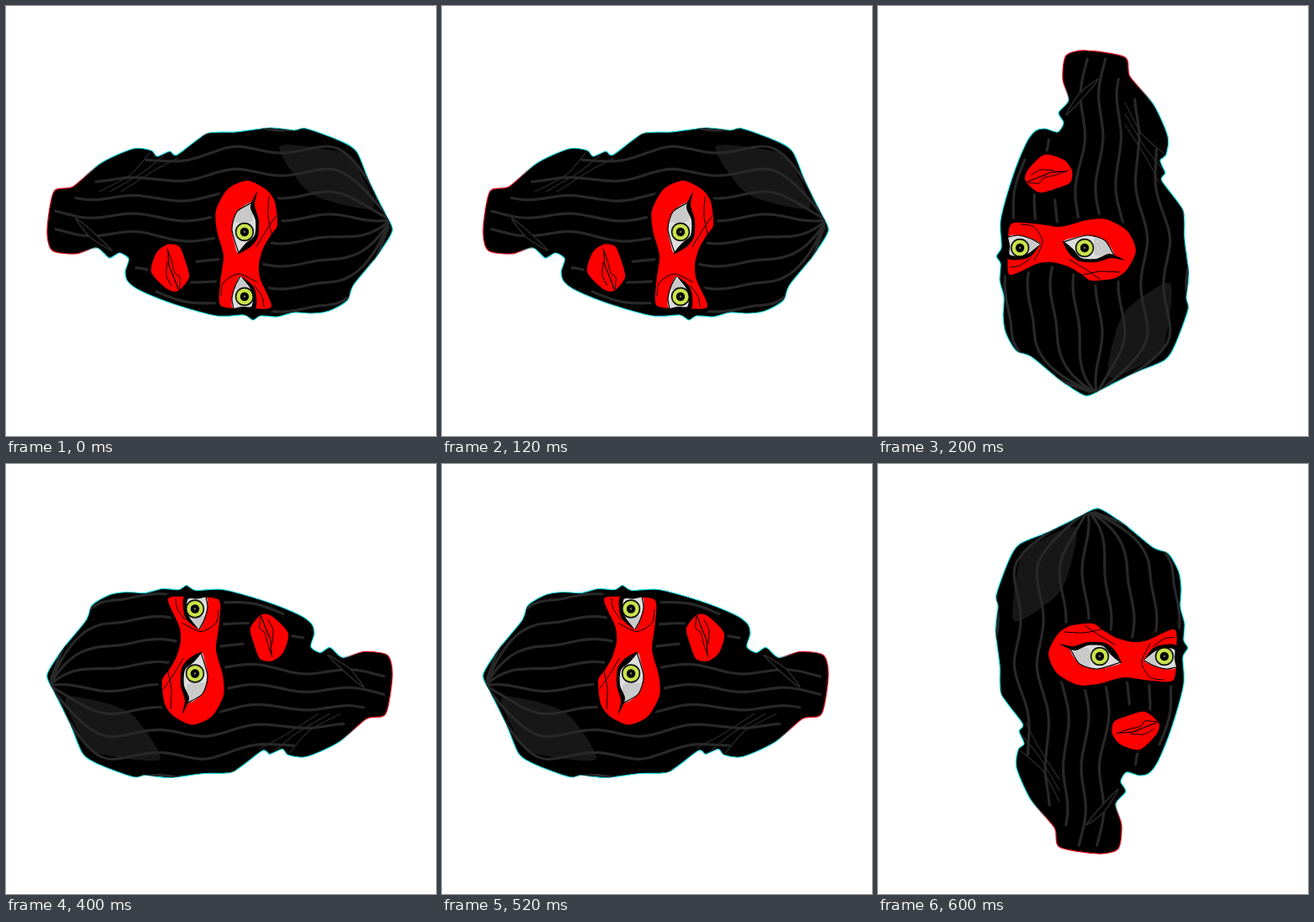
Recreate the animation shown at these times as an HTML page. Size 512 px wide and 512 px high, loop 800 ms.

```html
<!DOCTYPE html>
<html lang="en">
<head>
<meta charset="utf-8">
<title>Turning mask</title>
<style>
html, body { margin: 0; width: 100%; height: 100%; overflow: hidden; background: #fff; }
svg { display: block; width: 100vw; height: 100vh; }
path { fill: none; stroke-linecap: round; stroke-linejoin: round; }
</style>
</head>
<body>
<svg viewBox="0 0 512 512">
  <defs>
    <linearGradient id="fringe" gradientUnits="userSpaceOnUse" x1="0" y1="400" x2="0" y2="425">
      <stop stop-color="#19dfe3"/>
      <stop offset="1" stop-color="#e01020"/>
    </linearGradient>
    <clipPath id="inside"><path id="hood"/></clipPath>
  </defs>
  <g id="head"></g>
</svg>
<script>
const head = document.getElementById('head');

function add(tag, attrs, parent = head) {
  const el = document.createElementNS('http://www.w3.org/2000/svg', tag);
  for (const key in attrs) el.setAttribute(key, attrs[key]);
  return parent.appendChild(el);
}

// Catmull-Rom curve through key points; tension 0 gives straight edges.
function curve(text, closed, tension = 0.13) {
  const p = text.split(' ').map(s => s.split(',').map(Number));
  const n = p.length;
  const at = i => closed ? p[(i + n) % n] : p[Math.max(0, Math.min(n - 1, i))];
  const handle = (i, dir) => at(i).map((v, a) => v + dir * tension * (at(i + 1)[a] - at(i - 1)[a]));
  let d = `M${p[0]}`;
  for (let i = 0; i < (closed ? n : n - 1); i++) d += `C${handle(i, 1)} ${handle(i + 1, -1)} ${at(i + 1)}`;
  return d;
}
const shape = (text, fill, stroke = 'none', width = 0) =>
  add('path', { d: curve(text, true), style: `fill:${fill}`, stroke, 'stroke-width': width });
const line = (text, stroke = '#000', width = 1, parent = head) =>
  add('path', { d: curve(text, false), stroke, 'stroke-width': width }, parent);

function iris(cx, cy) {
  add('circle', { cx, cy, r: 10.4, fill: '#c9e24b', stroke: '#111', 'stroke-width': 1.6 });
  add('circle', { cx, cy, r: 5.2, fill: '#000' });
  add('circle', { cx, cy, r: 1.4, fill: '#666' });
}

// Hood
const hood = '263,53 295,73 327,99 346,107 358,128 361,148 360,170 365,190 364,210 369,219 363,230 364,262 350,313 334,353 323,368 311,371 296,367 289,378 295,390 283,405 290,430 286,458 262,464 216,456 210,433 182,400 165,362 167,340 174,333 168,318 172,309 147,274 145,240 140,198 143,170 141,155 156,114 169,95 205,80 243,61';
document.getElementById('hood').setAttribute('d', curve(hood, true));
shape(hood, '#000', 'url(#fringe)', 1.2);
shape('235,75 226,132 209,160 162,187 167,122 180,99', '#171717');

// Knitted stripes fan out from the crown, then sway together down to the neck.
const knit = add('g', { 'clip-path': 'url(#inside)' });
const ends = [287, 352, 407, 432, 457, 457, 292, 362, 345];
function stripeX(k, y) {
  const fan = Math.max(0, 130 - y) / 75;
  const taper = Math.max(0, Math.min(1, (y - 240) / 110));
  const gap = 27 * (1 - fan * fan) - 5.5 * taper;
  const sway = 4 * Math.cos((y - 185) * 2 * Math.PI / 115);
  return 247 + sway - Math.max(0, y - 340) * 0.05 + k * gap;
}
ends.forEach((end, i) => {
  const pts = [];
  for (let y = 58; y <= end; y += 12) pts.push(`${stripeX(i - 4, y).toFixed(1)},${y}`);
  line(pts.join(' '), '#282828', 3.2, knit);
});

// Folds at the neck
const fold = '#292929';
for (let i = 0; i < 3; i++) line(`${176 - i * 3},${308 + i * 17} ${190 + i * 3},${335 + i * 15} 216,${376 + i * 13}`, fold, 1.3, knit);
shape('248,430 261,413 286,387 270,413', '#000', fold, 1.6);

// Eye opening; the black rim keeps the stripes away from it
const opening = '228,193 256,190 268,198 284,207 303,212 321,210 353,197 355,224 352,257 326,258 296,254 283,256 262,262 238,263 213,249 203,226 213,204';
shape(opening, '#f00', '#000', 9);
shape(opening, '#f00');
line('222,200 245,201 266,197');
line('246,192 262,203 282,215');
line('324,214 314,236 324,254 340,257');
line('328,217 341,208 353,206');

// Eyes: white, shade, iris, heavy upper lid
shape('229,220 250,215 272,217 289,236 277,241 261,244 240,238', '#dedede');
shape('232,222 251,220 252,242 240,237', '#c9c9c9');
line('229,220 240,238 261,244 289,236', '#000', 1.2);
iris(264, 229);
shape('216,214 232,217 250,212 270,213 282,222 290,237 278,228 268,217 250,216 234,222', '#000');

shape('317,234 328,223 341,217 355,219 355,242 343,244 328,240', '#dedede');
shape('319,234 331,225 332,241', '#c9c9c9');
line('317,234 328,240 343,244 355,242', '#000', 1.2);
iris(341, 229);
shape('317,233 328,219 341,215 356,217 356,243 353,232 353,221 341,219 330,223', '#000');

// Mouth
const lips = '281,307 297,300 318,295 334,308 332,321 312,340 289,334 279,321';
shape(lips, '#f00', '#000', 7);
shape(lips, '#f00');
line('284,321 298,316 313,312 318,306 333,307');
line('287,320 304,319 316,314 332,308', '#000', 1.2);
line('300,321 316,322 328,316');

// Quarter turns; the offsets keep the slight wobble of the turn.
const poses = ['0 1 -1 0 513 5', '-1 0 0 -1 510 517', '0 -1 1 0 -4 513.5', '1 0 0 1 0 0'];
function draw() {
  const step = Math.floor(performance.now() / 200) % poses.length;
  head.setAttribute('transform', `matrix(${poses[step]})`);
  requestAnimationFrame(draw);
}
draw();
</script>
</body>
</html>
```
